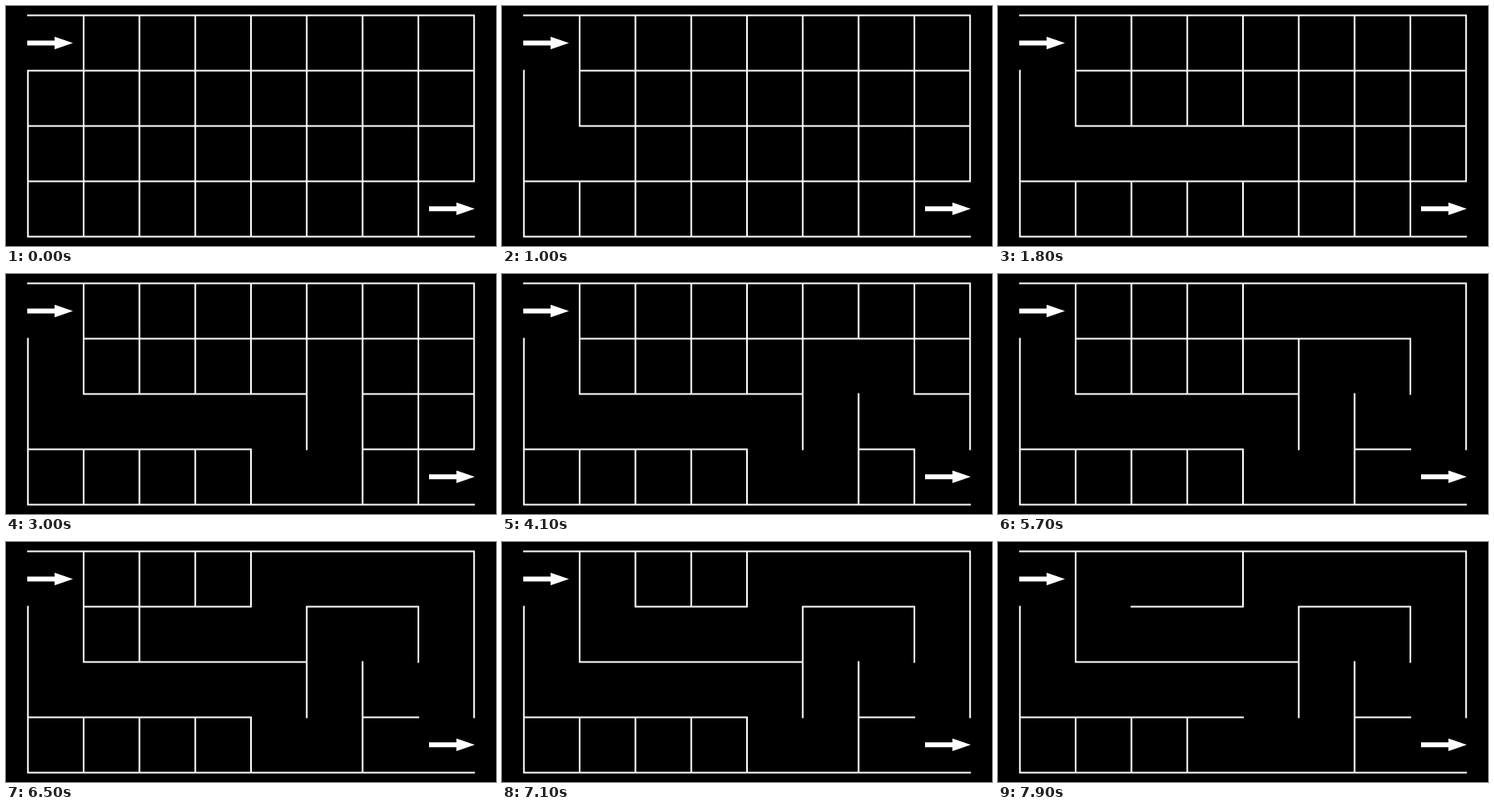
These frames come from a looping animation (600 by 295 pixels, 8000 ms). An HTML page with a canvas:

```html
<!DOCTYPE html>
<html lang="en">
<head>
<meta charset="utf-8">
<title>Maze carving</title>
<style>
  html, body { margin: 0; width: 100%; height: 100%; overflow: hidden; background: #000; }
  canvas { display: block; }
</style>
</head>
<body>
<canvas id="stage" width="600" height="295"></canvas>
<script>
const ctx = document.getElementById("stage").getContext("2d");
const COLS = 8, ROWS = 4, LOOP = 8000;
const gridX = col => 26.8 + 68.3 * col;
const gridY = row => 11.5 + 68 * row;

// Each walk starts in a cell and opens the wall crossed by every step.
const walks = [
  [0, 0, "DDRRRRDRUURDRDL"],
  [7, 2, "UULLLDLLLURR"],
  [4, 3, "L"]
];
const stepTimes = [
  3, 7, 10, 12, 15, 18, 21, 23, 26, 30, 32, 35, 38, 41,
  43, 46, 49, 51, 54, 57, 60, 63, 65, 68, 71, 73, 76, 79
].map(tenths => tenths * 100);

const moves = { U: [0, -1], D: [0, 1], L: [-1, 0], R: [1, 0] };
const wallKey = (kind, col, row) => kind + col + "," + row;

// Time at which each wall disappears; entrance and exit are always open.
const openAt = new Map([
  [wallKey("V", 0, 0), 0],
  [wallKey("V", COLS, ROWS - 1), 0]
]);
let step = 0;
for (let [col, row, path] of walks) {
  for (const letter of path) {
    const [dx, dy] = moves[letter];
    const key = dx
      ? wallKey("V", Math.max(col, col + dx), row)
      : wallKey("H", col, Math.max(row, row + dy));
    openAt.set(key, stepTimes[step++]);
    col += dx;
    row += dy;
  }
}

function addWall(kind, col, row, time) {
  if (time >= (openAt.get(wallKey(kind, col, row)) ?? Infinity)) return;
  ctx.moveTo(gridX(col), gridY(row));
  if (kind === "H") ctx.lineTo(gridX(col + 1), gridY(row));
  else ctx.lineTo(gridX(col), gridY(row + 1));
}

function drawArrow(x, y) {
  ctx.beginPath();
  ctx.moveTo(x, y - 3);
  ctx.lineTo(x + 33.5, y - 3);
  ctx.lineTo(x + 33.5, y - 7.8);
  ctx.lineTo(x + 56, y);
  ctx.lineTo(x + 33.5, y + 7.8);
  ctx.lineTo(x + 33.5, y + 3);
  ctx.lineTo(x, y + 3);
  ctx.fill();
}

function draw(time) {
  ctx.fillStyle = "#000";
  ctx.fillRect(0, 0, 600, 295);
  ctx.strokeStyle = ctx.fillStyle = "#fff";
  ctx.lineWidth = 2;
  ctx.lineCap = "square";
  ctx.beginPath();
  for (let row = 0; row <= ROWS; row++) {
    for (let col = 0; col <= COLS; col++) {
      if (col < COLS) addWall("H", col, row, time);
      if (row < ROWS) addWall("V", col, row, time);
    }
  }
  ctx.stroke();
  drawArrow(26, 45.5);
  drawArrow(518, 249.3);
}

const start = performance.now();
function tick() {
  draw((performance.now() - start) % LOOP);
  requestAnimationFrame(tick);
}
tick();
</script>
</body>
</html>
```
